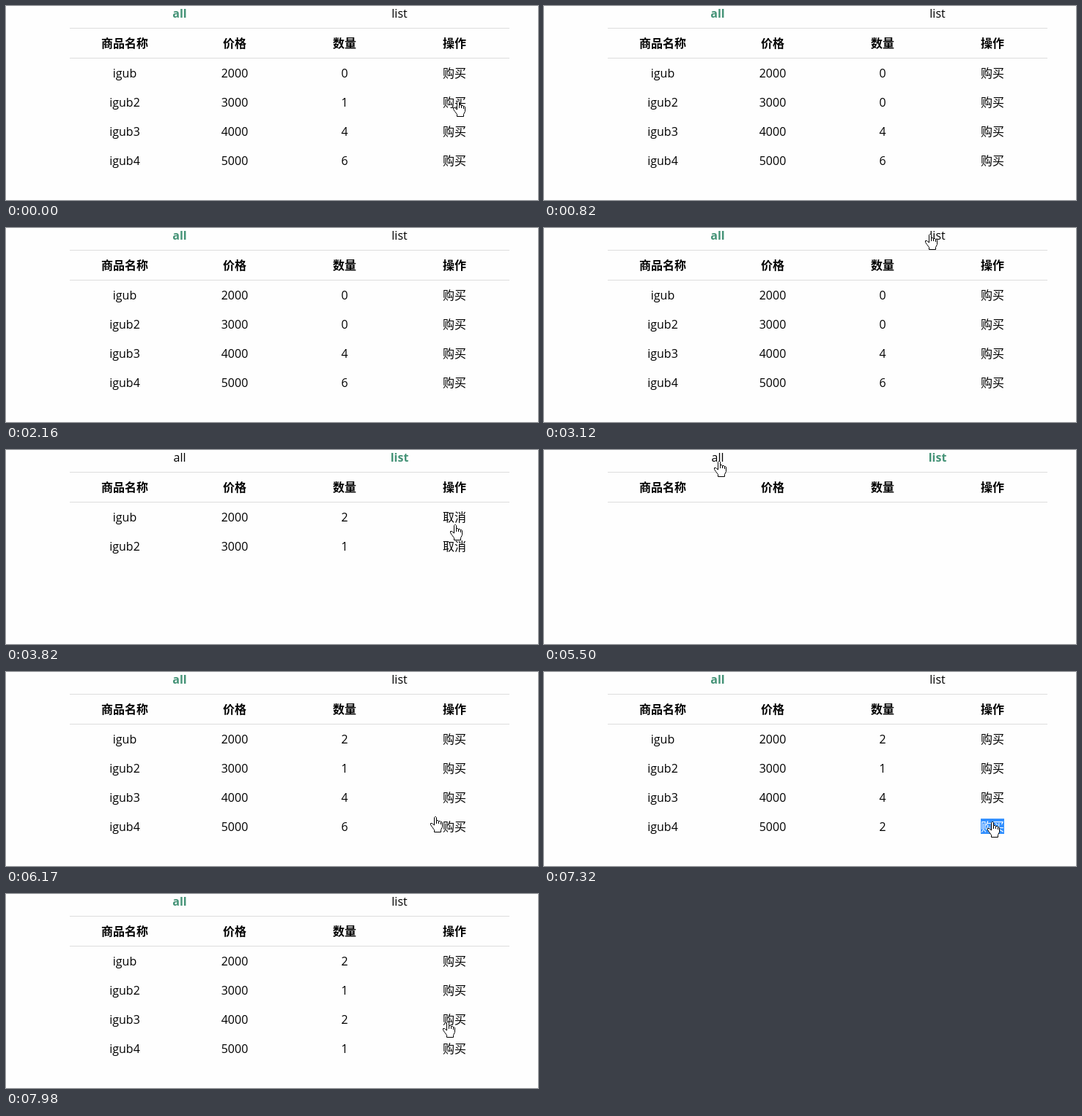
An HTML page that plays this animation: 726x266 px, repeating every 8 s.

```html
<!DOCTYPE html>
<html lang="zh-CN">
<head>
<meta charset="utf-8">
<style>
html, body { margin: 0; width: 726px; height: 266px; overflow: hidden; background: #fefefe; }
svg { display: block; }
text { font: 16px "Open Sans", "Noto Sans CJK SC", "Noto Sans CJK", sans-serif; text-anchor: middle; }
.head, .active { font-weight: 700; }
.active { fill: #459377; }
.picked { fill: #fff; }
#cursor path { fill: #fff; stroke: #000; stroke-linejoin: round; }
</style>
</head>
<body>
<svg width="726" height="266">
  <path d="M87 30.5H687M87 71.5H687" stroke="#ddd"/>
  <g id="page"></g>
  <g id="cursor">
    <path id="hand" d="M-.5 12V1.5L.5 .5H1.5L2.5 1.5V5.5H4.5L5.5 6.5H7.5L8.5 7.5H9.5L10.5 8.5V14.5L8.5 18.5V21.5H-.5V18.5L-3.5 14.5L-5.5 11.5V9.5H-3.5L-.5 12M2.5 5.5V10M5.5 6.5V10M8.5 7.5V11"/>
    <path id="arrow" d="M.5 .5V16L4 12.8L6.6 18.5L9 17.5L6.6 11.8H11.5Z"/>
  </g>
</svg>
<script>
const LOOP = 8000;
const $ = id => document.getElementById(id);
const prices = [2000, 3000, 4000, 5000];

// Screen refreshes: [first, last, steps]
const bursts = [[0, 0, 1], [150, 550, 4], [820, 820, 1], [2160, 3120, 8], [3400, 4360, 8],
  [4510, 5500, 8], [5780, 6170, 4], [6310, 6780, 4], [6900, 7860, 8], [7980, 7980, 1]];
const ticks = bursts.flatMap(([a, b, n]) =>
  Array.from({ length: n }, (_, i) => Math.floor((a + (b - a) * i / Math.max(1, n - 1)) / 10) * 10));

// Page states: [time, tab, amounts by item, selected row]
const states = [
  [0, 'all', [0, 1, 4, 6]],
  [150, 'all', [0, 0, 4, 6]],
  [3400, 'list', [2, 1]],
  [4650, 'list', [0, 1]],
  [4930, 'list', []],
  [5780, 'all', [2, 1, 4, 6]],
  [6780, 'all', [2, 1, 4, 5]],
  [7030, 'all', [2, 1, 4, 4], 3],
  [7170, 'all', [2, 1, 4, 3], 3],
  [7310, 'all', [2, 1, 4, 2], 3],
  [7440, 'all', [2, 1, 4, 1], 3],
  [7580, 'all', [2, 1, 4, 1]],
  [7720, 'all', [2, 1, 3, 1], 2],
  [7980, 'all', [2, 1, 2, 1]]
];

// Pointer path: [time, x, y, shape]
const moves = [
  [0, 616, 130, 'hand'], [280, 616, 130, 'hand'], [550, 615, 169, 'arrow'], [551, 615, 169, 'arrow'],
  [820, 615, 169, ''], [2290, 706, 122, 'arrow'], [2700, 560, 20, 'hand'], [2980, 526, 8, 'hand'],
  [3535, 526, 8, 'arrow'], [3810, 612, 102, 'hand'], [4080, 616, 106, 'hand'], [4350, 612, 99, 'hand'],
  [4930, 612, 99, 'arrow'], [5490, 238, 15, 'hand'], [5780, 238, 15, 'arrow'], [6170, 585, 198, 'hand'],
  [6460, 611, 205, 'hand'], [7440, 611, 205, 'hand'], [7710, 602, 175, 'hand'], [LOOP, 602, 175, 'hand']
];

const text = (s, x, y, cls = '') => `<text x="${x}" y="${y + 6}" class="${cls}">${s}</text>`;
const row = (cells, y, cls) => cells.map((s, i) => text(s, 162 + 150 * i, y, cls)).join('');

function drawPage([, tab, amounts, picked]) {
  let out = ['all', 'list'].map((s, i) => text(s, 237 + 300 * i, 10, s === tab ? 'active' : '')).join('');
  out += row(['商品名称', '价格', '数量', '操作'], 51, 'head');
  let y = 92;
  amounts.forEach((n, i) => {
    if (tab === 'list' && !n) return;
    out += row(['igub' + (i ? i + 1 : ''), prices[i], n], y);
    if (i === picked) out += `<rect x="596" y="${y - 11}" width="32" height="21" fill="#3390ff"/>`;
    out += text(tab === 'all' ? '购买' : '取消', 612, y, i === picked ? 'picked' : '');
    y += 40;
  });
  $('page').innerHTML = out;
}

function drawCursor(t) {
  const i = moves.findLastIndex(m => m[0] <= t);
  const [t0, x0, y0, shape] = moves[i];
  const [t1, x1, y1] = moves[i + 1];
  const k = (t - t0) / (t1 - t0);
  const mix = (a, b) => Math.round(a + (b - a) * k);
  $('cursor').setAttribute('transform', `translate(${mix(x0, x1)} ${mix(y0, y1)})`);
  for (const id of ['hand', 'arrow']) $(id).style.display = id === shape ? '' : 'none';
}

let shown;
function frame(now) {
  const time = now % LOOP;
  const t = ticks.findLast(s => s <= time);
  if (t !== shown) {
    shown = t;
    drawPage(states.findLast(s => s[0] <= t));
    drawCursor(t);
  }
  requestAnimationFrame(frame);
}
frame(performance.now());
</script>
</body>
</html>
```
